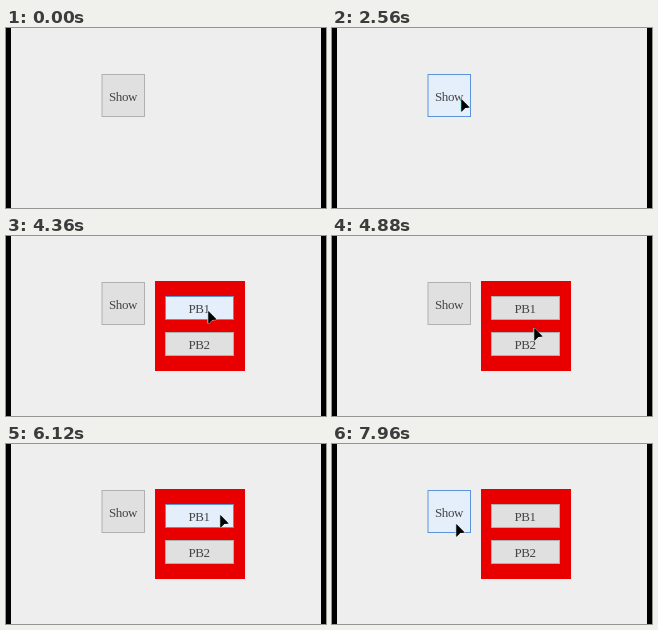
An HTML page that plays this animation: 320x180 px, repeating every 8000 ms.

```html
<!DOCTYPE html>
<html lang="en">
<head>
<meta charset="utf-8">
<title>Show popup</title>
<style>
  html, body { margin: 0; width: 100%; height: 100%; overflow: hidden; background: #eee; }
  svg { display: block; width: 100vw; height: 100vh; }
  text { font: 13px "Liberation Serif", serif; letter-spacing: -.4px; fill: #444; }
  .btn rect { fill: #e0e0e0; stroke: #b0b0b0; }
  .btn.hover rect { fill: #e4effb; stroke: #5c94dc; }
  .btn.press rect { fill: #cce4f7; stroke: #2a66a8; }
</style>
</head>
<body>
<svg viewBox="0 0 320 180">
  <rect width="320" height="180" fill="#eee"/>
  <path d="M0 0h5v180h-5zM315 0h5v180h-5z"/>
  <g class="btn" id="show">
    <rect x="96" y="46.5" width="42.5" height="42"/>
    <text x="103" y="73">Show</text>
  </g>
  <g id="panel">
    <rect x="149" y="45" width="90" height="90" fill="#e80000"/>
    <g class="btn" id="pb1">
      <rect x="159.5" y="60.5" width="68" height="23"/>
      <text x="182.5" y="77">PB1</text>
    </g>
    <g class="btn" id="pb2">
      <rect x="159.5" y="96.5" width="68" height="23"/>
      <text x="182.5" y="113">PB2</text>
    </g>
  </g>
  <g id="cursor">
    <path d="M.3 1L8.7 9.6L4.2 10.1L.3 14Z" stroke="#fff" stroke-opacity=".7" stroke-linejoin="round"/>
    <path d="M0 1V13" stroke="#7beeee"/>
    <path d="M.3 1L8.7 9.6L4.2 10.1L.3 14Z"/>
  </g>
</svg>
<script>
const LOOP = 8000, STEP = 40;
const $ = id => document.getElementById(id);
const panel = $('panel'), cursor = $('cursor');

// each sweep starts where the last one ended; bend is the control point of its curve
const sweeps = [
  { start: 1320, end: 1600, from: [78, 60], to: [35, 110] },
  { start: 1760, end: 2560, to: [129, 70], bend: [340, 122] },
  { start: 4160, end: 4360, to: [202, 74], bend: [165, 125] },
  { start: 4680, end: 5080, to: [202, 108] },
  { start: 5840, end: 6480, to: [266, 78], bend: [205, 40] },
  { start: 7200, end: 7480, to: [124, 79] }
];
sweeps.forEach((s, i) => { s.from ??= sweeps[i - 1].to; });

const buttons = [
  { el: $('show'), held: [[3080, 3520], [7720, 7800]] },
  { el: $('pb1'), held: [[4520, 4600]] },
  { el: $('pb2'), held: [[5240, 5320], [5560, 5640]] }
];
const opened = [[3520, 6680], [7800, LOOP]];

const ease = k => k * k * (3 - 2 * k);
const mix = (a, b, k) => a + (b - a) * k;
const during = (spans, t) => spans.some(([a, b]) => t >= a && t < b);

function pointer(t) {
  const s = sweeps.findLast(s => t >= s.start);
  if (!s) return null;
  const k = ease(Math.min(1, (t - s.start) / (s.end - s.start)));
  return s.from.map((a, i) => {
    const b = s.to[i], c = s.bend ? s.bend[i] : (a + b) / 2;
    return Math.round(mix(mix(a, c, k), mix(c, b, k), k));
  });
}

function hovered(el, [px, py]) {
  const { x, y, width, height } = el.querySelector('rect');
  const within = (p, from, size) => p >= from.baseVal.value && p <= from.baseVal.value + size.baseVal.value;
  return within(px, x, width) && within(py, y, height);
}

function draw(t) {
  const tip = pointer(t);
  cursor.style.display = tip ? '' : 'none';
  if (tip) cursor.setAttribute('transform', `translate(${tip})`);
  panel.style.display = during(opened, t) ? '' : 'none';
  for (const { el, held } of buttons) {
    const state = during(held, t) ? ' press' : tip && hovered(el, tip) ? ' hover' : '';
    el.setAttribute('class', 'btn' + state);
  }
}

const start = performance.now();
function tick() {
  const t = (performance.now() - start) % LOOP;
  draw(Math.floor(t / STEP) * STEP);
  requestAnimationFrame(tick);
}
tick();
</script>
</body>
</html>
```
